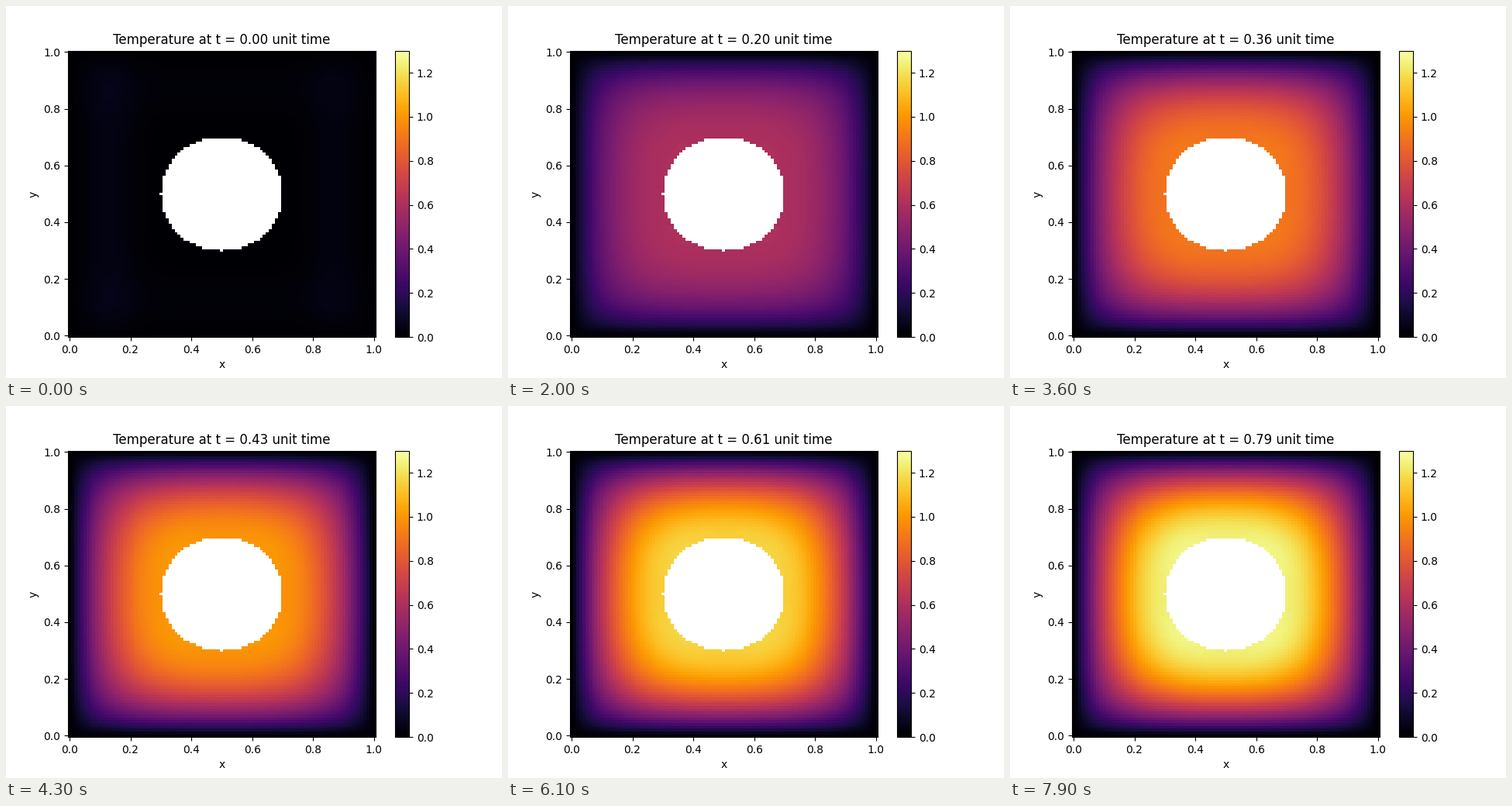
Animation of 640x480 px, one loop 8 s. Source, as a matplotlib script:

```python
import numpy as np
import matplotlib.pyplot as plt
from matplotlib.animation import FuncAnimation

N, FRAMES, INTERVAL = 101, 80, 100
KAPPA, SOURCE, RADIUS = 0.105, 3.26, 0.2
DT_FRAME, SUBSTEPS = 0.01, 50

axis = np.linspace(0, 1, N)
X, Y = np.meshgrid(axis, axis)
hole = (X - 0.5) ** 2 + (Y - 0.5) ** 2 <= RADIUS ** 2

# Faces next to the hole are insulated, the outer walls stay at zero.
solid = ~hole
open_x = solid[:, 1:] & solid[:, :-1]
open_y = solid[1:, :] & solid[:-1, :]
inner = solid.copy()
inner[[0, -1], :] = inner[:, [0, -1]] = False


def step(u, dt):
    rate = KAPPA * (N - 1) ** 2
    fx = np.diff(u, axis=1) * open_x
    fy = np.diff(u, axis=0) * open_y
    lap = np.zeros_like(u)
    lap[:, :-1] += fx
    lap[:, 1:] -= fx
    lap[:-1] += fy
    lap[1:] -= fy
    return u + dt * (rate * lap + SOURCE) * inner


def bump(s, center):
    return np.exp(-((s - center) / 0.1) ** 2)


def residue():
    """Faint warmth along the walls at the start."""
    ridge = bump(X, 0.12) + 0.75 * bump(X, 0.88)
    ridge += 0.45 * (bump(Y, 0.12) + bump(Y, 0.88))
    wall = 1.0
    for s in (X, 1 - X, Y, 1 - Y):
        wall = wall * (1 - np.exp(-s / 0.05))
    return 0.047 * ridge * wall


def solve():
    u, fields = np.zeros((N, N)), []
    start = residue()
    for i in range(FRAMES):
        faint = start * np.exp(-i * DT_FRAME / 0.03)
        fields.append(np.ma.masked_array(u + faint, hole))
        for _ in range(SUBSTEPS):
            u = step(u, DT_FRAME / SUBSTEPS)
    return fields


fields = solve()

fig, ax = plt.subplots(figsize=(6.4, 4.8), dpi=100)
mesh = ax.pcolormesh(X, Y, fields[0], cmap="inferno", vmin=0, vmax=1.3,
                     shading="nearest")
fig.colorbar(mesh, ax=ax)
ax.set_xlabel("x")
ax.set_ylabel("y")
title = ax.set_title("")


def update(i):
    mesh.set_array(fields[i])
    title.set_text(f"Temperature at t = {i * DT_FRAME:.2f} unit time")
    return mesh, title


anim = FuncAnimation(fig, update, frames=FRAMES, interval=INTERVAL,
                     repeat=True, repeat_delay=0, blit=False)
plt.show()
```
